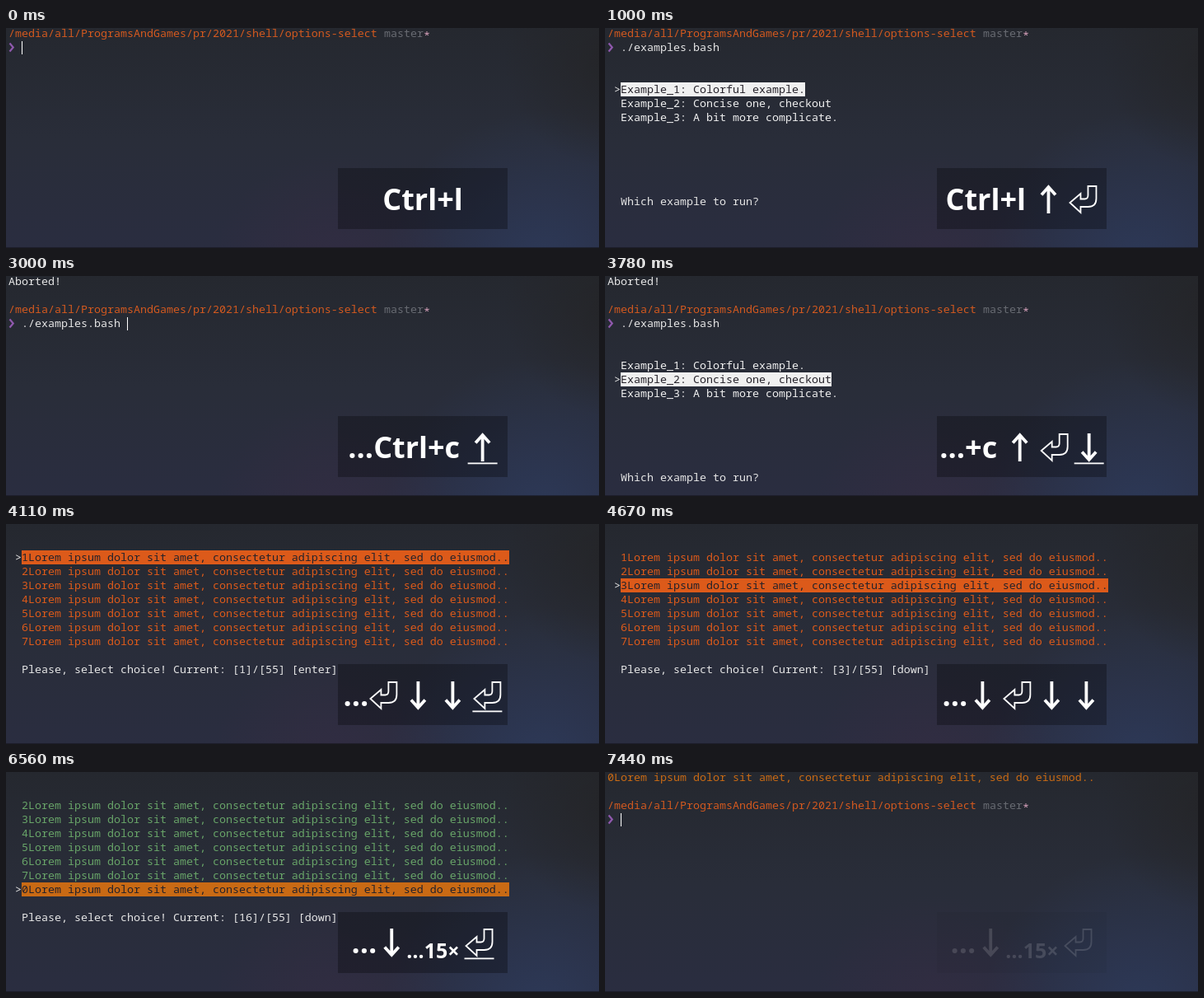
These frames come from a looping animation (720 by 267 pixels, 7550 ms). An HTML page with a canvas:

```html
<!DOCTYPE html>
<html lang="en">
<head>
<meta charset="utf-8">
<title>Options select demo</title>
<style>
  html, body { margin: 0; width: 100%; height: 100%; overflow: hidden; background: #272a34; }
  canvas { display: block; }
</style>
</head>
<body>
<canvas id="stage" width="720" height="267"></canvas>
<script>
const LOOP = 7550, W = 720, H = 267;
const CELL = 8, LINE = 17, LEFT = 3;
const ctx = document.getElementById('stage').getContext('2d');
const MONO = '13.333px "Noto Sans Mono", monospace';
const KEY_FONT = '"Noto Sans", "Open Sans", sans-serif';
const COLOR = {
  text: '#e6e6e6', dark: '#25222a', path: '#d2591f', branch: '#686b72', star: '#d9a3bd',
  chevron: '#9059ae', groups: ['#dc5a1a', '#68a468', '#c96a14']
};
const LOREM = 'Lorem ipsum dolor sit amet, consectetur adipiscing elit, sed do eiusmod..';
const EXAMPLES = ['Colorful example.', 'Concise one, checkout', 'A bit more complicate.'];

// ---------- terminal ----------
function write(row, col, text, color = COLOR.text, dy = 0) {
  ctx.font = MONO;
  ctx.fillStyle = color;
  ctx.fillText(text, LEFT + col * CELL, 11 + row * LINE + dy);
}

function option(row, text, color, selected) {
  if (selected) {
    write(row, 1, '>');
    ctx.fillStyle = color;
    ctx.fillRect(LEFT + 2 * CELL, row * LINE - 2, text.length * CELL, LINE);
  }
  write(row, 2, text, selected ? COLOR.dark : color);
}

function prompt(row, command = '', cursor = true) {
  write(row, 0, '/media/all/ProgramsAndGames/pr/2021/shell/options-select', COLOR.path);
  write(row, 57, 'master', COLOR.branch);
  write(row, 63, '*', COLOR.star, 3);
  const y = (row + 1) * LINE;
  ctx.strokeStyle = COLOR.chevron;
  ctx.lineWidth = 2.2;
  ctx.beginPath();
  ctx.moveTo(4.5, y + 1.5);
  ctx.lineTo(8.7, y + 6.5);
  ctx.lineTo(4.5, y + 11.5);
  ctx.stroke();
  write(row + 1, 2, command);
  if (cursor) {
    ctx.fillStyle = '#fff';
    ctx.fillRect(LEFT + (2 + command.length) * CELL, y - 1, 1, 16);
  }
}

const COMMAND = './examples.bash ';

function menu(row, selected) {
  prompt(row, COMMAND, false);
  EXAMPLES.forEach((label, i) =>
    option(row + 4 + i, `Example_${i + 1}: ${label}`, '#f0f0f0', i + 1 === selected));
  write(row + 12, 2, 'Which example to run?');
}

const loremLine = n => n % 8 + LOREM;
const loremColor = n => COLOR.groups[Math.floor(n / 8)];

function loremList(current, key = 'down') {
  const top = Math.max(1, current - 6);
  for (let i = 0; i < 7; i++) {
    const n = top + i;
    option(2 + i, loremLine(n), loremColor(n), n === current);
  }
  write(10, 2, `Please, select choice! Current: [${current}]/[55] [${key}]`);
}

function aborted(command) {
  write(0, 0, 'Aborted!');
  prompt(2, command);
}

const screens = [
  [0, () => prompt(0)],
  [220, () => prompt(0, COMMAND)],
  [780, () => menu(0, 1)],
  [1220, () => menu(0, 2)],
  [1440, () => menu(0, 3)],
  [1780, () => menu(0, 2)],
  [2670, () => aborted()],
  [3000, () => aborted(COMMAND)],
  [3440, () => { write(0, 0, 'Aborted!'); menu(2, 1); }],
  [3780, () => { write(0, 0, 'Aborted!'); menu(2, 2); }],
  [4000, () => { write(0, 0, 'Aborted!'); menu(2, 3); }],
  [4110, () => loremList(1, 'enter')],
  ...[[4330, 2], [4560, 3], [5110, 4], [5220, 6], [5330, 9], [5440, 12],
    [5560, 13], [5670, 14], [5780, 15], [6000, 16]].map(([t, n]) => [t, () => loremList(n)]),
  [6670, () => { write(0, 0, loremLine(16), loremColor(16)); prompt(2); }]
];

// ---------- pressed keys; a trailing "_" underlines the last key ----------
const keys = [
  [0, 'Ctrl+l'], [110, 'Ctrl+l ↑_'], [330, 'Ctrl+l ↑'],
  [670, 'Ctrl+l ↑ ⏎_'], [1000, 'Ctrl+l ↑ ⏎'],
  [1220, '…+l ↑ ⏎ ↓_'], [1330, '…+l ↑ ⏎ ↓'],
  [1440, '…↑ ⏎ ↓ ↓_'], [1560, '…↑ ⏎ ↓ ↓'],
  [1780, '…⏎ ↓ ↓ ↑_'], [2000, '…⏎ ↓ ↓ ↑'],
  [2560, '…↑ Ctrl+c'], [3000, '…Ctrl+c ↑_'], [3330, '…trl+c ↑ ⏎_'],
  [3780, '…+c ↑ ⏎ ↓_'], [3890, '…+c ↑ ⏎ ↓'],
  [4000, '…↑ ⏎ ↓ ↓_'], [4110, '…⏎ ↓ ↓ ⏎_'],
  [4330, '…↓ ↓ ⏎ ↓_'], [4440, '…↓ ↓ ⏎ ↓'],
  [4560, '…↓ ⏎ ↓ ↓_'], [4670, '…↓ ⏎ ↓ ↓'],
  [5110, '…⏎ ↓ ↓ ↓_'], [5220, '…↓ ↓ ↓…6×_'], [5330, '…↓ ↓ ↓…9×_'],
  [5440, '…↓ ↓…12×_'], [5670, '…↓ ↓…13×_'], [5780, '…↓ ↓…14×_'],
  [6000, '…↓ ↓…15×_'], [6220, '…↓ ↓…15×'],
  [6560, '…↓…15× ⏎_'], [6890, '…↓…15× ⏎']
];

const ARROW = new Path2D('M18 191V223M9.5 213.5L18 223L26.5 213.5');
const RETURN = new Path2D(
  'M24 192H34V207Q34 217 24 217H15V224L2 212L15 201V207.5H20Q24 207.5 24 203Z');
const SYMBOL_WIDTH = 36;
const isSymbol = s => '↑↓⏎'.includes(s);
const isCount = s => s.endsWith('×');
const keyFont = s => `bold ${isCount(s) ? 25 : 36}px ${KEY_FONT}`;

function drawSymbol(symbol, x, dy) {
  ctx.save();
  ctx.translate(x, dy);
  if (symbol === '↑') {
    ctx.translate(0, 416);
    ctx.scale(1, -1);
  }
  ctx.strokeStyle = '#fff';
  ctx.lineWidth = symbol === '⏎' ? 1.8 : 3.8;
  ctx.stroke(symbol === '⏎' ? RETURN : ARROW);
  ctx.restore();
}

function drawKeys(spec, alpha) {
  ctx.globalAlpha = alpha;
  ctx.fillStyle = 'rgba(8, 6, 10, .34)';
  ctx.fillRect(403, 170, 206, 74);

  const tokens = spec.replace('_', '').match(/…\d+×|[↑↓⏎… ]|[^…↑↓⏎ ]+/g);
  const widths = tokens.map((s, i) => {
    if (s === ' ') return /\w$/.test(tokens[i - 1]) || /^\w/.test(tokens[i + 1]) ? 9.5 : 6;
    if (isSymbol(s)) return SYMBOL_WIDTH;
    ctx.font = keyFont(s);
    return ctx.measureText(s).width;
  });
  const dy = tokens.some(isCount) ? -1 : 0;
  let x = 506 - widths.reduce((a, b) => a + b) / 2;

  tokens.forEach((s, i) => {
    ctx.fillStyle = '#fff';
    if (isSymbol(s)) {
      drawSymbol(s, x, dy);
    } else {
      ctx.font = keyFont(s);
      ctx.fillText(s, x, isCount(s) ? 226 : 221 + dy);
    }
    if (i === tokens.length - 1 && spec.endsWith('_')) {
      ctx.fillRect(x, isCount(s) ? 228 : 226.5 + dy, widths[i], 1.8);
    }
    x += widths[i];
  });
  ctx.globalAlpha = 1;
}

// ---------- backdrop ----------
function glow(x, y, radius, rgb, alpha) {
  const g = ctx.createRadialGradient(x, y, 0, x, y, radius);
  g.addColorStop(0, `rgba(${rgb}, ${alpha})`);
  g.addColorStop(1, `rgba(${rgb}, 0)`);
  ctx.fillStyle = g;
  ctx.fillRect(0, 0, W, H);
}

function backdrop() {
  const g = ctx.createLinearGradient(0, 0, 0, H);
  g.addColorStop(0, '#25282f');
  g.addColorStop(.5, '#292d39');
  g.addColorStop(1, '#2a2d40');
  ctx.fillStyle = g;
  ctx.fillRect(0, 0, W, H);
  glow(650, 290, 190, '46, 62, 98', .7);
  glow(400, 300, 150, '58, 44, 68', .5);
  glow(735, 40, 130, '36, 36, 38', .8);
  ctx.fillStyle = 'rgba(20, 21, 27, .6)';
  ctx.fillRect(0, H - 1, W, 1);
}

const at = (list, t) => list.findLast(([start]) => start <= t)[1];

function frame(now) {
  const t = now % LOOP;
  const fadeStep = t < 6890 ? 0 : Math.min(6, Math.floor((t - 6890) / 110) + 1);
  backdrop();
  at(screens, t)();
  drawKeys(at(keys, t), 1 - fadeStep / 7);
}

const begin = performance.now();
function tick() {
  frame(performance.now() - begin);
  requestAnimationFrame(tick);
}
tick();
</script>
</body>
</html>
```
